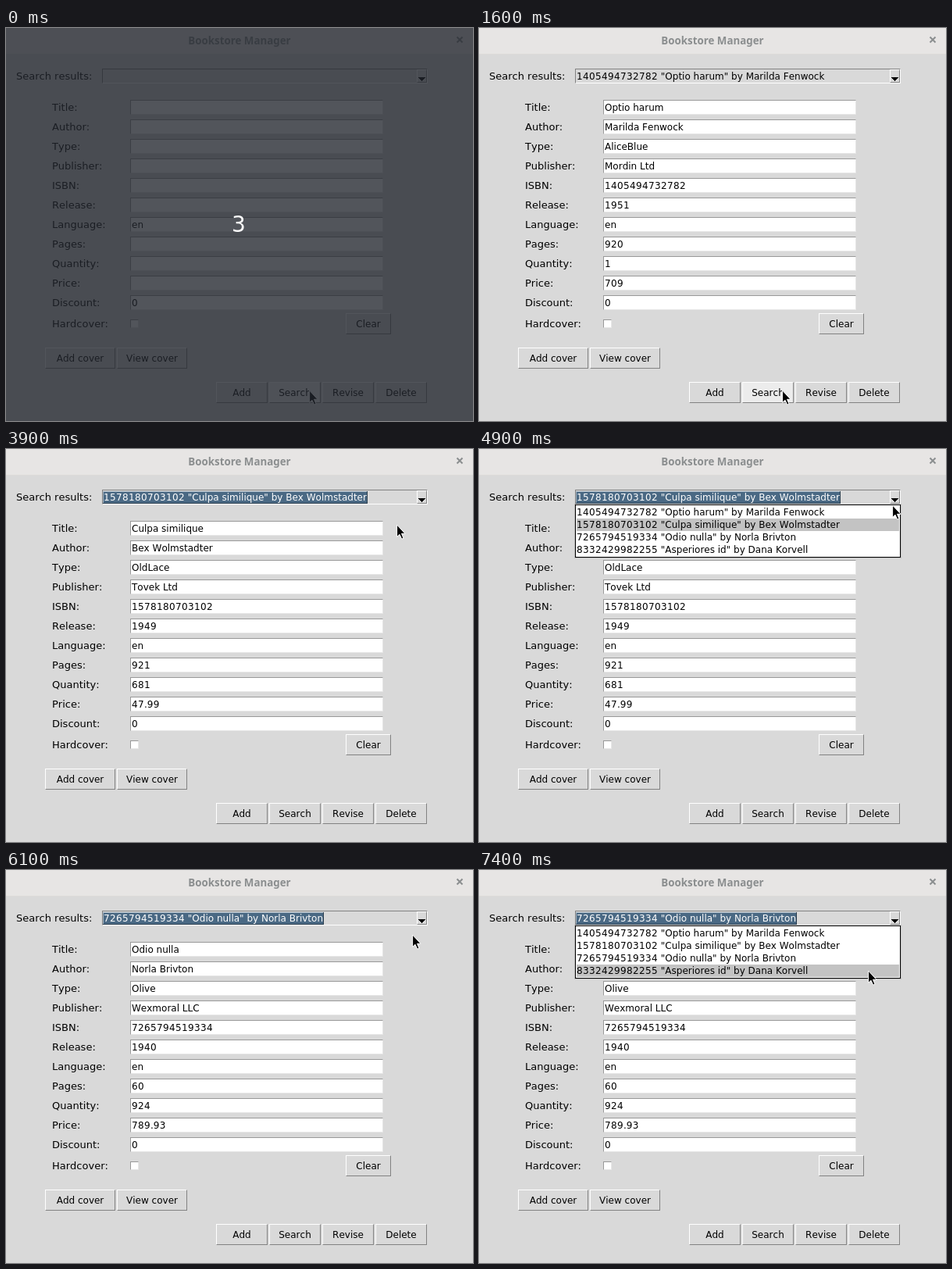
These frames come from a looping animation (598 px wide and 503 px high, 8000 ms). An HTML page:

```html
<!DOCTYPE html>
<html lang="en">
<head>
<meta charset="utf-8">
<title>Bookstore Manager</title>
<style>
html, body { margin: 0; width: 100%; height: 100%; overflow: hidden; background: #d9d9d9; }
div, svg { position: absolute; box-sizing: border-box; }
div { font: 12px "DejaVu Sans", sans-serif; color: #000; white-space: pre; font-kerning: none; }
i { font-style: normal; letter-spacing: .365px; }
#bar { width: 598px; height: 34px; background: #e7e5e4; border-bottom: 1px solid #dcdad8;
  font: bold 13.33px/32px "Noto Sans", sans-serif; color: #8b8e8f; text-align: center; }
.label { font-size: 13px; line-height: 20px; }
.field, .button, .sunk { border: 1px solid; }
.sunk { border-color: #828282 #fff #fff #828282; }
.field { border-color: #999 #e6e6e6 #e6e6e6 #999; background: #fff; padding-left: 1px; line-height: 18px; }
.button { border-color: #fff #828282 #828282 #fff; text-align: center; line-height: 26px; }
.button.on { background: #ececec; }
.button.down { border-color: #828282 #fff #fff #828282; }
#value { left: 124px; top: 54px; height: 16px; padding: 0 1px; line-height: 16px; }
#value.picked { background: #4a6984; color: #fff; box-shadow: inset -1px -1px #2c3f4f, inset 1px 1px #a4b4c1; }
#list { left: 123px; top: 71px; width: 417px; height: 68px; background: #fff; border: 1px solid #000; padding: 1px;
  box-shadow: 0 0 0 1px rgba(0,0,0,.12); }
#list div { position: static; height: 16px; line-height: 16px; }
#list .on { background: #c3c3c3; }
#shade { width: 598px; height: 503px; background: rgba(34,38,46,.78); }
#count { left: 278px; top: 234px; width: 40px; text-align: center; font-size: 28px; line-height: 36px; color: #fff; }
</style>
</head>
<body>
<div id="bar">Bookstore Manager</div>
<svg width="598" height="34"><path d="M577.5 11.5l7 7m0-7l-7 7" stroke="#8b8e8f" stroke-width="2"/></svg>
<script>
const books = [
  ["Optio harum", "Marilda Fenwock", "AliceBlue", "Mordin Ltd", "1405494732782", "1951", "en", "920", "1", "709", "0"],
  ["Culpa similique", "Bex Wolmstadter", "OldLace", "Tovek Ltd", "1578180703102", "1949", "en", "921", "681", "47.99", "0"],
  ["Odio nulla", "Norla Brivton", "Olive", "Wexmoral LLC", "7265794519334", "1940", "en", "60", "924", "789.93", "0"],
  ["Asperiores id", "Dana Korvell", "", "", "8332429982255"]
];
const blank = ["", "", "", "", "", "", "en", "", "", "", "0"];
// Digits are set slightly wider than the letters
const spaced = s => s.replace(/\d+/g, "<i>$&</i>");
const titleOf = b => spaced(`${b[4]} "${b[0]}" by ${b[1]}`);

// Pointer keys: time, x, y
const path = [
  [0, 388, 463], [1600, 388, 463], [1900, 498, 157], [2000, 498, 157], [2500, 521, 69], [2600, 521, 69],
  [2700, 524, 60], [2900, 524, 60], [3000, 522, 67], [3100, 514, 78], [3200, 514, 78], [3600, 500, 96],
  [3900, 500, 96], [4400, 535, 63], [4800, 535, 63], [5300, 504, 104], [5400, 504, 104], [5500, 498, 110],
  [5800, 498, 110], [6300, 535, 63], [6700, 535, 63], [7100, 503, 121], [7300, 503, 121], [7400, 498, 128],
  [8000, 498, 128]
];

function add(cls, x, y, w, h, text = "") {
  const el = document.createElement("div");
  el.className = cls;
  el.style.cssText = `left:${x}px;top:${y}px;` + (w ? `width:${w}px;height:${h}px` : "");
  el.textContent = text;
  document.body.append(el);
  return el;
}
const label = (text, x, y) => add("label", x, y, 0, 0, text);
const button = (text, x, y, w) => add("button", x, y, w, 27, text);

label("Search results:", 13, 52);
add("sunk", 123, 52, 417, 19);
const arrow = add("button", 526, 53, 13, 17);
arrow.innerHTML = `<svg style="left:1px;top:9px" width="9" height="5" shape-rendering="crispEdges">
<path d="M-.5 0h10L4.5 5z"/></svg>`;

const fields = ["Title", "Author", "Type", "Publisher", "ISBN", "Release", "Language", "Pages", "Quantity", "Price", "Discount"]
  .map((name, i) => {
    label(name + ":", 59, 92 + 25 * i);
    return add("field", 159, 92 + 25 * i, 324, 19);
  });
label("Hardcover:", 59, 369);
add("field", 159, 373, 11, 11);

button("Clear", 435, 365, 58);
button("Add cover", 50, 409, 90);
button("View cover", 142, 409, 90);
const [, search] = ["Add", "Search", "Revise", "Delete"].map((s, i) => button(s, 269 + 68 * i, 453, 66));

document.body.insertAdjacentHTML("beforeend", `<div id="value"></div>
<div id="list">${books.map(b => `<div>${titleOf(b)}</div>`).join("")}</div>
<svg id="pointer" width="18" height="24" viewBox="-1 -1 18 24">
<path d="M.6 1V16.5L4 13.3 6.7 19.2 9 18.2 6.5 12.3H11Z" stroke="#fff"/></svg>
<div id="shade"></div><div id="count">3</div>`);
const $ = id => document.getElementById(id);
const show = (el, on) => el.style.display = on ? "" : "none";

function pointerAt(t) {
  const i = Math.max(1, path.findIndex(k => k[0] >= t));
  const [t0, x0, y0] = path[i - 1], [t1, x1, y1] = path[i];
  const u = (t - t0) / (t1 - t0);
  return [Math.round(x0 + (x1 - x0) * u), Math.round(y0 + (y1 - y0) * u)];
}

function draw(t) {
  const [x, y] = pointerAt(t);
  const pick = t < 1600 ? -1 : t < 3800 ? 0 : t < 5800 ? 1 : 2;
  const open = t >= 3000 && t < 3800 || t >= 4800 && t < 5800 || t >= 6700;
  const row = y < 73 ? pick : Math.floor((y - 73) / 16);
  const book = books[pick] || blank;

  fields.forEach((el, i) => el.innerHTML = spaced(book[i]));
  $("value").innerHTML = pick < 0 ? "" : titleOf(book);
  $("value").className = pick > 0 ? "picked" : "";
  show($("list"), open);
  [...$("list").children].forEach((el, i) => el.className = i === row ? "on" : "");
  search.classList.toggle("on", t < 1700);
  search.classList.toggle("down", t >= 1000 && t < 1600);
  arrow.classList.toggle("on", x >= 526 && y < 71);
  $("pointer").style.left = x - 1 + "px";
  $("pointer").style.top = y - 1 + "px";
  show($("shade"), t < 500);
  show($("count"), t < 300);
}

const start = performance.now();
let last = -1;
function tick() {
  // The screen refreshes ten times a second
  const t = Math.floor((performance.now() - start) % 8000 / 100) * 100;
  if (t !== last) draw(last = t);
  requestAnimationFrame(tick);
}
tick();
</script>
</body>
</html>
```
